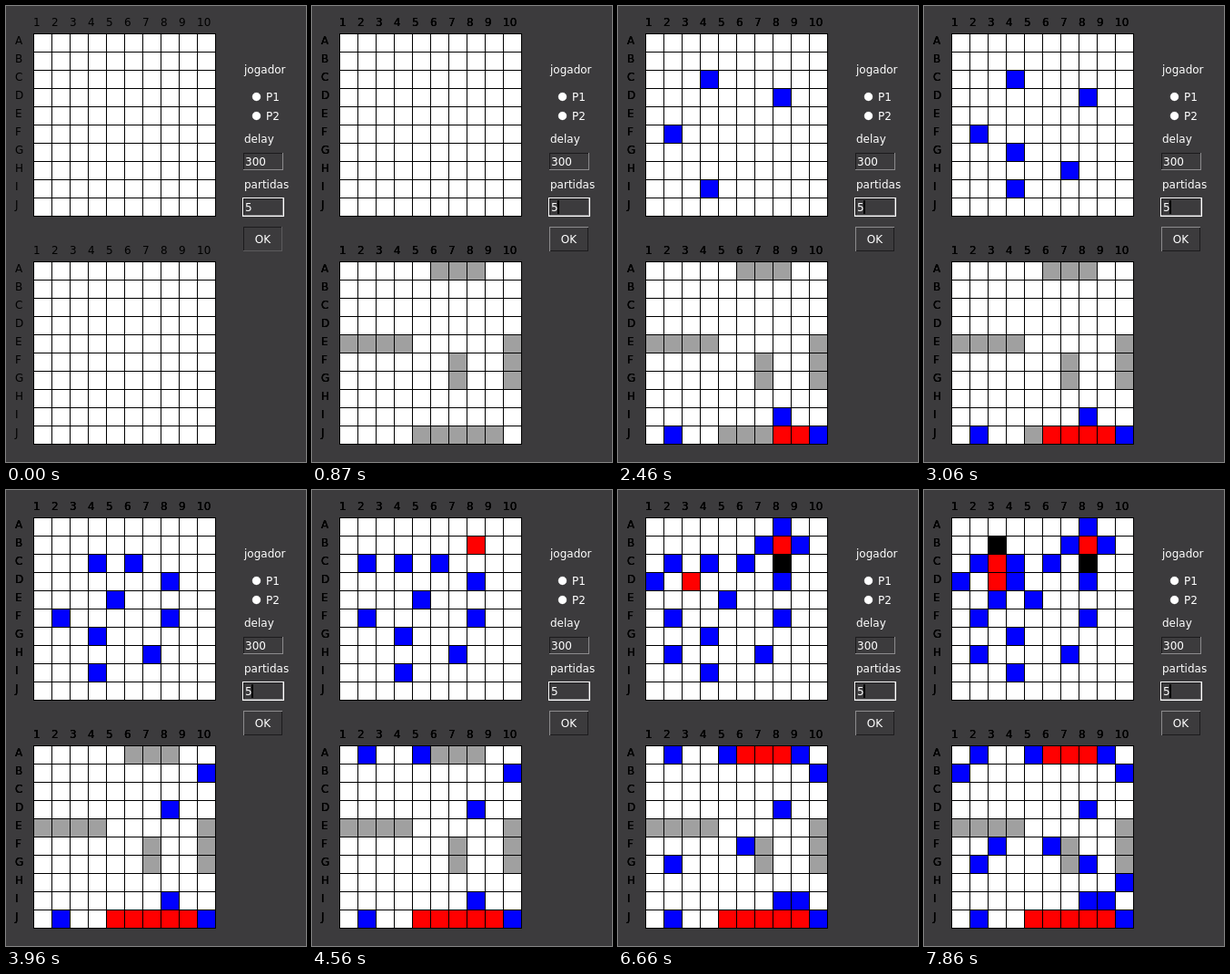
Write an HTML page that moves like this. It is 330 px wide and 500 px high and loops after 8 s.

```html
<!DOCTYPE html>
<html lang="pt">
<head>
<meta charset="utf-8">
<title>Batalha naval</title>
<style>
html, body { margin: 0; width: 330px; height: 500px; overflow: hidden; background: #3c3b3d; }
svg { display: block; font: 12px "DejaVu Sans", sans-serif; shape-rendering: crispEdges; }
text { fill: #fff; white-space: pre; }
.label text { fill: #000; }
.playing .label text { text-shadow: 0 0 0 #000, 0 0 0 #000; }
circle { shape-rendering: auto; }
.ships, .raised, .cursor { visibility: hidden; }
.playing .ships, .playing .raised, .blink .cursor { visibility: visible; }
.playing .sunken { visibility: hidden; }
</style>
</head>
<body>
<svg id="stage" width="330" height="500" viewBox="0 0 330 500">
  <g id="boards"></g>
  <text x="262" y="74">jogador</text>
  <circle cx="275.5" cy="99.5" r="5" fill="#fff" stroke="#252426" stroke-width=".7"/>
  <text x="286" y="104">P1</text>
  <circle cx="275.5" cy="120.5" r="5" fill="#fff" stroke="#252426" stroke-width=".7"/>
  <text x="286" y="125">P2</text>
  <text x="262" y="150">delay</text>
  <g fill="none">
    <path d="M261.5 180V161.5H305" stroke="#1c1b1d"/>
    <path d="M261 179.5H304.5V161" stroke="#8c8b8d"/>
  </g>
  <text x="263" y="175">300</text>
  <text x="262" y="200">partidas</text>
  <g fill="none">
    <path d="M261.5 230V211.5H305" stroke="#1c1b1d"/>
    <path d="M261 229.5H304.5V211" stroke="#8c8b8d"/>
    <rect x="260.5" y="210.5" width="45" height="20" stroke="#fff"/>
  </g>
  <text x="263" y="225">5</text>
  <rect class="cursor" x="270" y="213" width="2" height="15" fill="#000"/>
  <g fill="none">
    <g class="sunken">
      <path d="M261.5 269V242.5H304" stroke="#1c1b1d"/>
      <path d="M261 268.5H303.5V242" stroke="#5c5b5d"/>
    </g>
    <g class="raised">
      <path d="M261 268.5H303.5V242" stroke="#1c1b1d"/>
      <path d="M261.5 269V242.5H304" stroke="#8c8b8d"/>
    </g>
  </g>
  <text x="282.5" y="260" text-anchor="middle">OK</text>
</svg>
<script>
const LOOP = 8000, START = 280, FIRST_SHOT = 1250, DELAY = 300;
const ROWS = "ABCDEFGHIJ";
const stage = document.getElementById("stage");
const boards = document.getElementById("boards");
const shots = [];

function add(parent, tag, attrs, text) {
  const el = document.createElementNS("http://www.w3.org/2000/svg", tag);
  for (const key in attrs) el.setAttribute(key, attrs[key]);
  if (text) el.textContent = text;
  return parent.appendChild(el);
}

function cell(parent, top, name, fill) {
  const x = 10 + 20 * parseInt(name.slice(1));
  const y = top + 20 * ROWS.indexOf(name[0]);
  return add(parent, "rect", { x, y, width: 20, height: 20, fill });
}

// A trailing * is a hit, # is the shot that sinks a ship.
function board(top, ships, moves, firstTurn) {
  const g = add(boards, "g", {});
  add(g, "rect", { x: 30, y: top, width: 200, height: 200, fill: "#fff" });
  const fleet = add(g, "g", { class: "ships" });
  for (const name of ships) cell(fleet, top, name, "#a0a0a0");
  moves.split(" ").forEach((move, i) => {
    const fill = move.endsWith("*") ? "#f00" : move.endsWith("#") ? "#000" : "#00f";
    shots.push({ el: cell(g, top, move, fill), turn: firstTurn + i });
  });
  const labels = add(g, "g", { class: "label" });
  let lines = "";
  for (let i = 0; i <= 10; i++) {
    const d = 20 * i + 0.5;
    lines += `M${30 + d} ${top}v201M30 ${top + d}h201`;
    if (i === 10) break;
    add(labels, "text", { x: 30 + 20 * i, y: top - 8 }, String(i + 1));
    add(labels, "text", { x: 10, y: top + 12 + 20 * i }, ROWS[i]);
  }
  add(g, "path", { d: lines, stroke: "#000", fill: "none" });
}

board(30, [],
  "D8 I4 C4 F2 G4 H7 C6 E5 F8 C2 B8* A8 B9 B7 C8# D1 H2 D3* D4 E3 C3* B3#", 1);
board(280,
  "A6 A7 A8 E1 E2 E3 E4 E10 F10 G10 F7 G7 J5 J6 J7 J8 J9".split(" "),
  "J2 J8* I8 J9* J10 J7* J6* J5* B10 D8 A2 A5 G2 A8* A9 A7* A6* I9 F6 H10 B1 F3 G8", 0);

function draw(t) {
  const turn = Math.floor((t - FIRST_SHOT) / DELAY);
  stage.classList.toggle("playing", t >= START);
  stage.classList.toggle("blink", turn >= -3 && (turn + 3) % 3 !== 2);
  for (const s of shots) s.el.setAttribute("visibility", turn >= s.turn ? "visible" : "hidden");
}

const began = performance.now();
function tick() {
  draw((performance.now() - began) % LOOP);
  requestAnimationFrame(tick);
}
tick();
</script>
</body>
</html>
```
